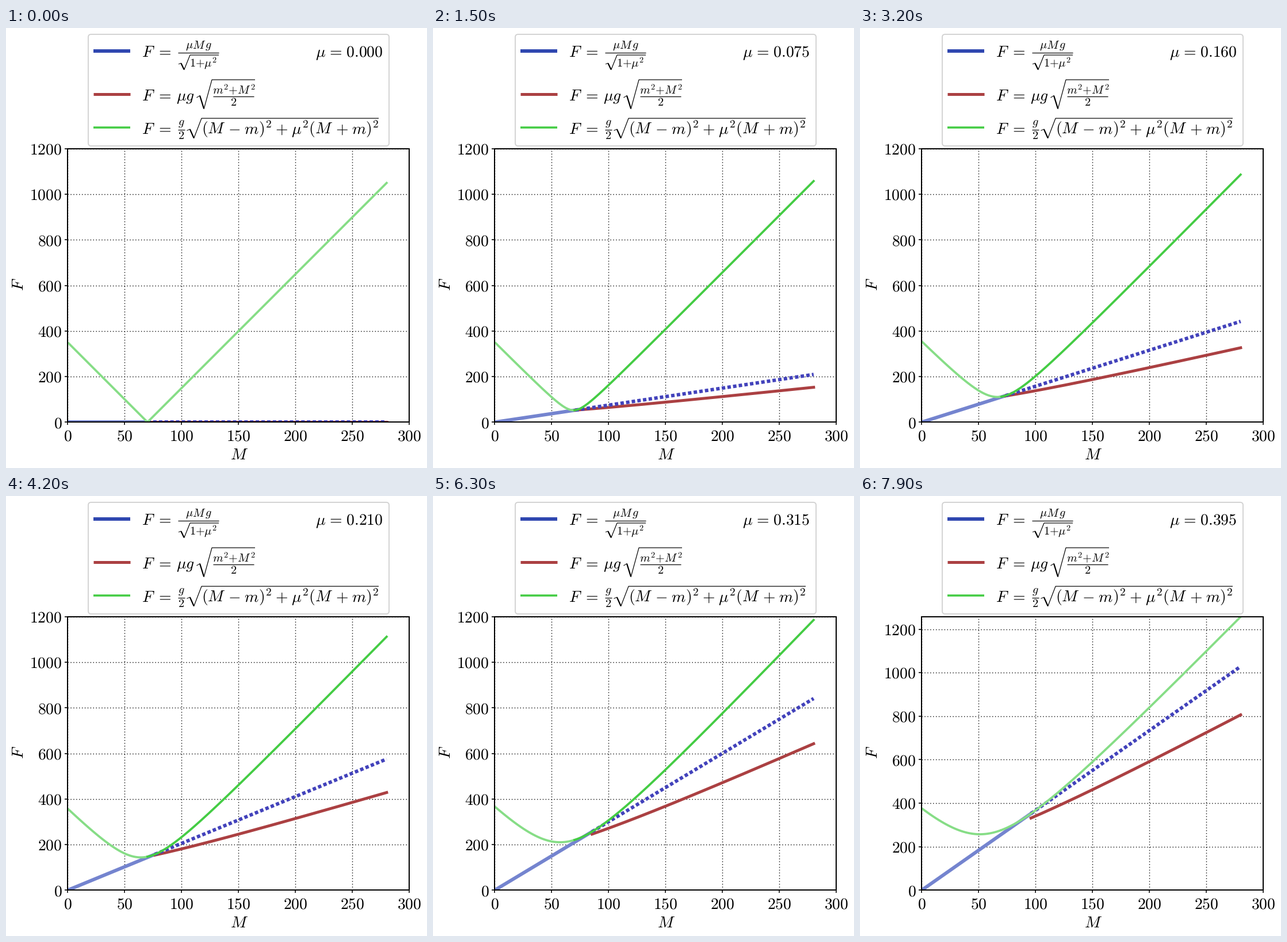
These frames come from a looping animation (732x765 px, 8000 ms). A matplotlib script:

```python
import numpy as np
import matplotlib.pyplot as plt
from matplotlib.animation import FuncAnimation
from matplotlib.patches import FancyBboxPatch

W, H = 732, 765
FRAMES, STEP = 80, 0.005
m, g, M_END = 70, 10, 280
SIZE, SMALL = 27.7, 20.3

BLUE, BLUE_SOFT, DOTS = "#2f47b0", "#7484cf", "#4242bb"
RED = "#ab4042"
GREEN, GREEN_SOFT = "#44cc44", "#86dd86"

plt.rcParams["mathtext.fontset"] = "cm"
plt.rcParams["text.hinting"] = "none"

# At 72 dpi one point is one pixel.
fig = plt.figure(figsize=(W / 72, H / 72), dpi=72, facecolor="white")
ax = fig.add_axes([107.4 / W, (H - 685.3) / H, 594 / W, 475.3 / H])
page = fig.add_axes([0, 0, 1, 1])
page.set(xlim=(0, W), ylim=(H, 0))
page.axis("off")


def put(x, y, tex, size=SIZE, ha="left"):
    return page.text(x, y, f"${tex}$", fontsize=size, ha=ha, va="baseline")


def stroke(xs, ys, lw=1.2, color="black"):
    page.plot(xs, ys, color=color, lw=lw, solid_capstyle="butt",
              solid_joinstyle="miter")


def radical(x, x_bar, x_end, top, bottom):
    """Root sign with its hook at x and its bar from x_bar to x_end."""
    w, h = x_bar - x, bottom - top
    hook = [x + 0.05 * w, x + 0.25 * w], [bottom - 0.39 * h, bottom - 0.46 * h]
    foot = x + 0.5 * w
    stroke(*hook, 1)
    stroke([hook[0][1], foot], [hook[1][1], bottom - 1], 2.2)
    stroke([foot, x_bar, x_end], [bottom, top, top], 1.2)


def legend():
    page.add_patch(FancyBboxPatch(
        (143, 11), 523, 194, boxstyle="round,pad=0,rounding_size=5",
        fc="white", ec="#d0d0d0", lw=1.8))
    for y, color, lw in ((39.5, BLUE, 6), (115, RED, 5), (173, GREEN, 3.6)):
        stroke([152, 216], [y, y], lw, color)
    for y in (50, 126, 184):
        put(236.5, y, r"F\hspace{0.274}=")

    put(334.5, 37, r"\mu M\hspace{0.12}g", SMALL, "center")
    stroke([299, 370], [43, 43])
    radical(299, 320, 370, 47, 73)
    put(319, 68, r"1{+}\mu^2", SMALL)

    put(296, 126, r"\mu g")
    radical(330, 358, 433, 90, 141)
    put(396, 114, r"m^2{+}M\hspace{0.12}^2", SMALL, "center")
    stroke([360, 431], [118.5, 118.5])
    put(396, 135, "2", SMALL, "center")

    put(305, 170, "g", SMALL, "center")
    stroke([299, 311], [177, 177])
    put(305, 193, "2", SMALL, "center")
    radical(313, 340, 648, 157, 192)
    put(340, 184, r"(M\hspace{0.184}-\hspace{0.06}m)^2\hspace{0.06}+"
                  r"\hspace{0.06}\mu^2(M\hspace{0.184}+\hspace{0.06}m)^2")


def style_axes():
    ax.set_xlim(0, 300)
    x_ticks, y_ticks = range(0, 301, 50), range(0, 1201, 200)
    ax.set_xticks(x_ticks, [f"${v}$" for v in x_ticks])
    ax.set_yticks(y_ticks, [f"${v}$" for v in y_ticks])
    ax.tick_params(length=5, width=1.6, labelsize=SIZE)
    ax.tick_params(axis="x", pad=7)
    ax.tick_params(axis="y", pad=5)
    ax.grid(color="black", ls=(0, (1, 2.5)), lw=1.4)
    for spine in ax.spines.values():
        spine.set_linewidth(2)
    put(405, 749.5, "M", ha="center")
    page.text(22, 446, "$F$", fontsize=SIZE, rotation=90,
              ha="center", va="center")


def blue(M, mu):
    return mu * M * g / np.sqrt(1 + mu**2)


def red(M, mu):
    return mu * g * np.sqrt((m**2 + M**2) / 2)


def green(M, mu):
    return g / 2 * np.sqrt((M - m)**2 + mu**2 * (M + m)**2)


def curve(color, lw, z, **kw):
    return ax.plot([], [], color=color, lw=lw, zorder=z, **kw)[0]


legend()
style_axes()
blue_line = curve(BLUE_SOFT, 6, 2.1)
red_line = curve(RED, 5, 2.2)
dot_line = curve(DOTS, 6, 2.3, ls=(0, (1, 0.65)), dash_capstyle="butt")
left_line = curve(GREEN_SOFT, 3.8, 2.4, solid_capstyle="butt")
right_line = curve(GREEN, 3.8, 2.4)
readout = put(538, 50, "")


def update(i):
    mu = i * STEP
    touch = m * (1 + mu**2) / (1 - mu**2)  # blue is tangent to green here
    before = np.linspace(0, touch, 50)
    after = np.linspace(touch, M_END, 200)
    near, far = np.linspace(0, m, 120), np.linspace(m, M_END, 250)

    blue_line.set_data(before, blue(before, mu))
    dot_line.set_data(after, blue(after, mu))
    red_line.set_data(after, red(after, mu))
    left_line.set_data(near, green(near, mu))
    right_line.set_data(far, green(far, mu))

    peak = green(M_END, mu)
    right_line.set_color(GREEN_SOFT if i == 0 or peak > 1200 else GREEN)
    ax.set_ylim(0, max(1200, peak))
    readout.set_text(rf"$\mu\hspace{{0.116}}=\hspace{{0.116}}{mu:.3f}$")
    return blue_line, dot_line, red_line, left_line, right_line, readout


anim = FuncAnimation(fig, update, frames=FRAMES, interval=100,
                     repeat=True, repeat_delay=0, blit=False)
plt.show()
```
